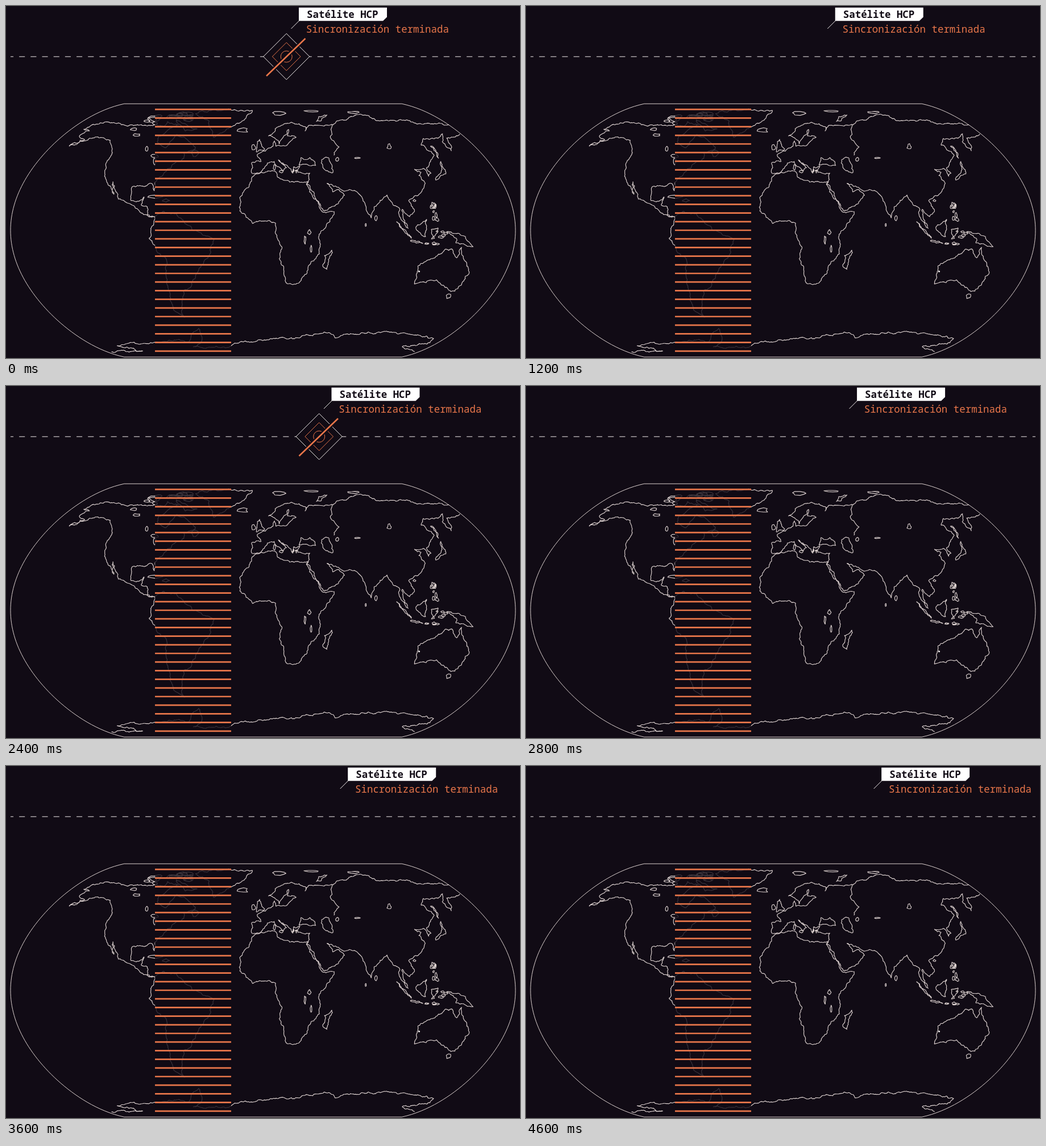
An HTML page for the animation above (4.8 s loop, 904 px wide and 620 px high).

```html
<!DOCTYPE html>
<html lang="es">
<head>
<meta charset="utf-8">
<style>
  html, body { margin: 0; height: 100%; overflow: hidden; background: #110b15; }
  svg { display: block; fill: none; }
  text { font: 500 17.45px "Noto Sans Mono", "DejaVu Sans Mono", monospace; white-space: pre; }
  .map { stroke: #dcd1cf; stroke-linejoin: round; }
  .white { stroke: #f4eeee; }
  .orange { stroke: #e8764a; }
</style>
</head>
<body>
<svg width="904" height="620" viewBox="0 0 904 620">
  <path class="map" id="land" stroke-width="1.15"/>
  <circle cx="726.5" cy="467.5" r="1.6" fill="#f4eeee"/>
  <rect x="262" y="173" width="134" height="444.5" fill="#110b15" fill-opacity=".8"/>
  <path class="map" id="rim"/>
  <path class="orange" id="stripes" stroke-width="2.7"/>
  <path class="white" d="M8 89.2H896" stroke-dasharray="10.1 10.08" stroke-dashoffset="5.05"/>
  <g id="sat">
    <g id="icon">
      <path class="white" fill="#110b15" d="M493.2 48.5l40.6 40.6l-40.6 40.6l-40.6-40.6z"/>
      <path class="orange" d="M493.2 64.3l24.8 24.8l-24.8 24.8l-24.8-24.8z"/>
      <circle class="orange" cx="493.2" cy="89.1" r="10"/>
      <path stroke="#110b15" stroke-width="7" d="M470 111.7L514.5 69"/>
      <path class="orange" stroke-width="2.6" d="M458 123.2L526.5 57.3"/>
    </g>
    <path class="white" d="M501.5 40L516 25.5"/>
    <path fill="#fff" d="M515 2.7H670V19.5L663 26.3H515z"/>
    <text x="529" y="20.6" fill="#110b15" style="font-weight:600">Satélite HCP</text>
    <text x="527.8" y="47" fill="#e8764a" style="font-weight:400">Sincronización terminada</text>
  </g>
</svg>
<script>
const $ = id => document.getElementById(id);

// Oval projection with a flat pole line
const project = ([lon, lat]) => {
  const t = Math.abs(lat) / 90;
  const x = 1 - .45 * t * t, y = 1.116 * t - .116 * t ** 6.3;
  return [452 + 444 * lon / 180 * x, 395.2 - 223 * Math.sign(lat) * y];
};

// Key points as "lon,lat"; the shoreline between them is roughened, z closes a shape
const coasts = {
  northAmerica: `-165,54 -157,58.5 -165,61 -161,64.5 -168,65.6 -163,69 -156,71.3 -135,69 -115,68.5
    -95,68 -95,71.5 -82,69 -94,61 -92,57 -82,53 -78,62 -70,60 -57,53 -66,50 -64,46 -70,43 -76,37
    -81,31 -80.4,25.2 -84,30 -97,28 -96,19 -91,18.6 -87,21.3 -88,16 -83.5,15 -83,10 -77.3,8.6
    -85.7,10 -94.5,16 -105.5,20 -113,31 -109.5,23 -115,28.5 -121,34.5 -124.4,42 -124,48.5 -134,58
    -148,60.3 -154,59 -165,54`,
  southAmerica: `-77.3,8.6 -71.7,12.2 -62,10.5 -50.5,0 -35,-6 -39,-16 -48,-26 -54.5,-34.9 -62,-39
    -65.5,-46 -68.5,-52.3 -67,-55.6 -74.5,-51 -73.5,-38 -70.3,-18.3 -76.5,-13.5 -81.3,-5 -80,0 -77.3,8.6`,
  africa: `-6,35.8 10,37.2 11,34 20,30.8 34.2,31.2 32.5,29.5 37.3,20 43.2,11.6 51.2,11.9 40,-2.5
    40.7,-15 35,-20 32.8,-27 27,-33.7 18.4,-34 11.8,-18 13.7,-11 8.8,-.8 9,4.5 4.3,6.3 -7.5,4.4
    -16.7,12.4 -17,21 -9.8,29.7z`,
  southAsia: `34.2,31.2 32.5,29.5 35,28.5 43.3,12.7 52,15.6 59.8,22.4 56,26 51.5,24.5 48,30 57,26.5
    66.5,25.3 72.5,20.5 77.5,8 80.2,15 91,22.5 94.3,16 98.5,13 98.4,8 103.5,1.3 100.3,9 100.3,13.4
    105,8.7 109,12.5 106,19 114,22.4 121.8,30 119.2,35 122,37 118,39 125,39.5 126.4,34.5 129.4,36.5
    128,40 140,48 135.3,54.7 142,59.2 155,59.3 163.5,62.5 156,57 157,51 163,59.5 179,62.3`,
  northEurasia: `180,69 160,70 140,72.5 128,72.5 113.5,74 104,77.7 80.5,73 74,72 68,69 44,68.5
    39,64.5 41,67 28,71 14.5,67.5 5,61 11,59 14,55.6 18,60 24,65.5 22,61 29.5,60 21,55 11,54 10,57.5
    8.5,54 -4.7,48.5 -1.5,44 -9,43.2 -9,37 -2,36.8 3.5,43 9,44 15.8,38 18.4,40 12.4,45 19.4,41
    23,36.5 24,40.5 29,41 27,37 36,36.5 34.2,31.2`,
  antarctica: `-175,-83 -137,-82 -155,-77 -110,-74 -75,-73.5 -66,-66.5 -59,-63.5 -62,-73 -75,-78
    -36,-78 -18,-73 16,-70.5 61,-66.8 71,-70.5 80,-67.5 134,-66.7 169,-71 172,-74.5 150,-78 175,-83`,
  australia: `113.7,-22.5 115.5,-34.2 124,-33.3 131,-31.5 138,-35 146.3,-39 150.5,-37 153.2,-27
    146,-18.5 142.5,-10.8 140.5,-17.5 136,-12 131,-12 122.2,-18z`,
  greenland: "-73,78.2 -54,72 -44,60 -22,71 -12,81.5 -40,83.3z",
  baffin: "-88,73 -62,66 -72,64.5z",
  britain: "-5.5,50.1 1.5,52 -3,58.6 -5,55z",
  urals: "67,69 60,60 64.5,53.5 58,48",
  blackSea: "28.5,41.5 41.5,41.5 38,46.5 33,45.3 30.8,46.5z",
  caspian: "47,45 53,46.5 54,37 49,38z",
  novayaZemlya: "53,71.5 58,75.5 68,77 58,72z",
  madagascar: "49.5,-12.5 47.2,-24.8 44,-23 44.5,-16z",
  sumatra: "95.3,5.6 106,-5 98.7,1.7z",
  java: "105.2,-6.6 114.4,-8.3z",
  borneo: "109,1.5 117,7 116,-4z",
  sulawesi: "125,1.5 120,.5 122.5,-5 120.3,-5.5z",
  newGuinea: "131,-.8 137,-2 144.5,-4 150.7,-10.4 138,-8 138,-5z",
  japan: "130.5,32 140.5,36 142,44 139.5,39z",
  sakhalin: "142,46 142.5,54 144,49z"
};

let seed = 7;
const random = () => (seed = seed * 16807 % 2147483647) / 2147483647;
const spread = size => (random() - .5) * size;

// Splits long edges at slightly shifted midpoints
const rough = (a, b) => {
  const dx = b[0] - a[0], dy = b[1] - a[1], len = Math.hypot(dx, dy);
  if (len < 3) return "L" + b.map(v => v.toFixed(1));
  const k = spread(Math.min(.4, 4.5 / len));
  const mid = [(a[0] + b[0]) / 2 - dy * k, (a[1] + b[1]) / 2 + dx * k];
  return rough(a, mid) + rough(mid, b);
};
const trace = text => {
  const pts = text.replace("z", "").split(/\s+/).map(p => project(p.split(",").map(Number)));
  if (text.endsWith("z")) pts.push(pts[0]);
  return "M" + pts[0] + pts.slice(1).map((p, i) => rough(pts[i], p)).join("");
};

// Ragged closed outline for small islands and lakes
const blob = (lon, lat, w, h) => {
  const [x, y] = project([lon, lat]);
  return "M" + [...Array(9)].map((_, i) => {
    const a = i / 9 * 2 * Math.PI, r = .65 + random() * .6;
    return [(x + w / 2 * r * Math.cos(a)).toFixed(1), (y + h / 2 * r * Math.sin(a)).toFixed(1)];
  }).join("L") + "z";
};
const scatter = (count, lon, lat, dLon, dLat, w, h) => [...Array(count)].map(() =>
  blob(lon + spread(dLon), lat + spread(dLat), w * (.5 + random()), h * (.5 + random()))).join("");

const islands =
  blob(-19, 65, 19, 8) + blob(-8, 53.3, 8, 9) + blob(17, 78.5, 24, 6) + blob(54, 80.7, 24, 3) +
  blob(100, 79.5, 20, 4) + blob(146.5, -42, 9, 8) + blob(80.8, 7.7, 5, 10) + blob(73.3, 3.5, 2, 5) +
  blob(-79.5, 21.5, 25, 6) + blob(-71, 19, 13, 5) + blob(-56, 49, 12, 11) + blob(110, 19, 5, 4);
const lakes =
  blob(33, -1.2, 6, 8) + blob(30, -6, 3, 13) + blob(34.5, -12, 3, 13) + blob(107, 53.5, 7, 10) +
  blob(59.7, 45.5, 5, 6) + blob(76.5, 46.3, 11, 2) + blob(-97.5, 52, 4, 9) + blob(-88, 47.5, 14, 6) +
  blob(-86.5, 44, 5, 12) + blob(-121, 65.7, 13, 5) + blob(-114, 61.7, 12, 4);
const archipelagos =
  scatter(12, -97, 75, 45, 6, 16, 6) + scatter(4, -113, 72, 14, 4, 16, 7) +
  scatter(8, 123, 12, 4, 11, 5, 8) + scatter(6, 126, -5, 9, 9, 7, 3) + scatter(4, 119, -8.6, 8, 1, 8, 3) +
  scatter(6, 25, 37, 4, 4, 3, 2) + blob(9, 40.2, 4, 8) + blob(14, 37.5, 7, 4);

$("land").setAttribute("d", Object.values(coasts).map(trace).join("") + islands + lakes + archipelagos);

const meridian = (lon, dir) => [...Array(91)].map((_, i) => project([lon, dir * (90 - 2 * i)]));
$("rim").setAttribute("d", `M${[...meridian(180, 1), ...meridian(-180, -1)].join("L")}z`);

$("stripes").setAttribute("d", [...Array(29)].map((_, i) => `M262 ${182.2 + i * 15.2}H396`).join(""));

function draw() {
  const step = Math.floor(performance.now() % 4800 / 200);
  $("sat").setAttribute("transform", `translate(${step * 4.79})`);
  $("icon").style.display = step % 4 < 2 ? "" : "none";
  requestAnimationFrame(draw);
}
draw();
</script>
</body>
</html>
```
